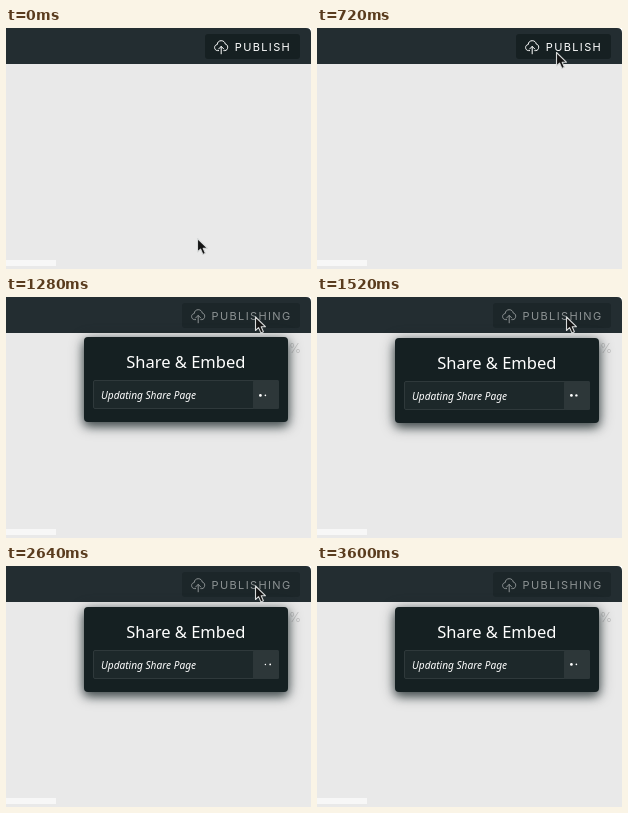
An HTML page that plays this animation: 305x241 px, repeating every 3.68 s.

```html
<!DOCTYPE html>
<html lang="en">
<head>
<meta charset="utf-8">
<title>Publish</title>
<style>
html, body { margin: 0; width: 100%; height: 100%; overflow: hidden; background: #e9e9e9; }
svg { display: block; width: 100%; height: 100%; }
.label { font: 400 11px Inter, Roboto, sans-serif; letter-spacing: 1.36px; }
.percent { font: 300 13px Inter, Roboto, sans-serif; }
.title { font: 400 16.5px "Noto Sans", "Open Sans", sans-serif; }
.status { font: italic 500 10.1px "Noto Sans", "Open Sans", sans-serif; }
</style>
</head>
<body>
<svg viewBox="0 0 305 241">
  <defs>
    <filter id="near" x="-30%" y="-60%" width="160%" height="220%" color-interpolation-filters="sRGB">
      <feGaussianBlur stdDeviation="5"/>
    </filter>
    <filter id="far" x="-30%" y="-60%" width="160%" height="220%" color-interpolation-filters="sRGB">
      <feGaussianBlur stdDeviation="7.5"/>
    </filter>
    <g id="cloud" fill="none" stroke="currentColor" stroke-linecap="round" stroke-linejoin="round">
      <path d="M4.6 10.6H3.6C1.6 10.6.6 9 .6 7.5.6 5.9 1.7 4.7 3.2 4.6 3.3 2.2 5 .7 7.2.7c2.2 0 3.7 1.3 4.1 3.4 1.5.2 2.4 1.5 2.4 3.1 0 1.9-1.1 3.4-3 3.4h-.9"/>
      <path d="M7.2 13.8V6.5M4.6 9l2.6-2.6L9.8 9"/>
    </g>
  </defs>

  <rect width="305" height="241" fill="#e9e9e9"/>
  <rect y="232" width="50" height="6" fill="#f7f7f7"/>
  <path d="M299 0h6v6z" fill="#fff"/>
  <path d="M0 0H300Q305 0 305 5V36H0z" fill="#232d31"/>

  <g id="publish" color="#fff">
    <rect x="199" y="6" width="95" height="25" rx="3" fill="#162022"/>
    <use href="#cloud" x="208" y="12"/>
    <text class="label" x="228.8" y="23" fill="#fff">PUBLISH</text>
  </g>

  <g id="busy" color="#8d9394">
    <rect x="176" y="6" width="118" height="25" rx="3" fill="#1c2629"/>
    <use href="#cloud" x="185" y="12"/>
    <text class="label" x="205.6" y="23" fill="#8d9394">PUBLISHING</text>
    <text class="percent" x="283" y="56" fill="#bdbdbd">%</text>
    <g id="panel">
      <rect x="78" y="44" width="204" height="85" rx="4" fill="#142022" opacity=".5" filter="url(#far)"/>
      <rect x="78" y="45" width="204" height="85" rx="4" fill="#142022" opacity=".62" filter="url(#near)"/>
      <rect x="78" y="41" width="204" height="85" rx="4" fill="#152022"/>
      <text class="title" x="179.8" y="72" text-anchor="middle" fill="#fff">Share &amp; Embed</text>
      <rect x="87.5" y="84.5" width="185" height="28" rx="1.5" fill="#1d282a" stroke="#2f393b"/>
      <rect x="247" y="84" width="26" height="29" rx="1.5" fill="#2d3739"/>
      <text class="status" x="95" y="103" fill="#fff">Updating Share Page</text>
    </g>
    <g id="dots" fill="#fff">
      <circle cx="254.4" cy="98.4"/><circle cx="259.4" cy="98.4"/><circle cx="264.2" cy="98.4"/>
    </g>
  </g>

  <g id="ring" fill="none">
    <circle cx="253" cy="28" stroke="#000" stroke-width="3.2"/>
    <circle cx="253" cy="28" stroke="#fff" stroke-width="1.2"/>
  </g>

  <path id="arrow" d="M.5.5V14L3.6 11.1 5.9 16.4 8.4 15.3 6.2 10.2H10.4z" fill="#151515" stroke="#d8dada" stroke-width="1.1" stroke-linejoin="round"/>
  <g id="hand" stroke="#333" stroke-width=".9" stroke-linecap="round" stroke-linejoin="round" fill="#fff">
    <path d="M-3.2 8.6C-3.8 6.6-5.6 4.8-7 2.3-7.8.7-6 -.3-4.9 1L-3.8 2.2-5.9-4.5C-6.3-6.3-4.2-6.8-3.7-5.1L-2.3-1-2.5-6.8C-2.5-8.6-.3-8.6-.2-6.9L.1-1.2 1.4-6.6C1.8-8.2 3.9-7.8 3.6-6L2.9-.7 4.8-4.1C5.6-5.5 7.6-4.7 7-3.1L5.8 1.5C5.2 4.2 4.4 5.7 4.2 8.6z"/>
  </g>
</svg>
<script>
const LOOP = 3680, STEP = 80, PRESS = 1120, OPEN = 1280;
const $ = id => document.getElementById(id);
const show = (el, on) => el.setAttribute("display", on ? "inline" : "none");
const move = (el, x, y) => el.setAttribute("transform", `translate(${x} ${y})`);

// pointer route: time, x, y
const route = [
  [0, 191, 210], [80, 197, 196], [160, 221, 140], [240, 252, 68],
  [320, 270, 24.5], [400, 279, 12], [480, 248, 10], [560, 209, 16],
  [640, 220, 25], [720, 239, 24], [800, 249, 19.5], [2720, 249, 19.5],
  [2800, 247, 28], [2880, 230, 78], [2960, 197, 152], [3040, 164, 212.5],
  [3120, 143, 232], [3200, 135, 252]
];
// dot pulse: delay, duration, largest radius
const pulses = [[0, 2100, 1.4], [580, 1800, 1.4], [1340, 1200, 1]];
const CYCLE = 2320, DOT_START = 460;

function pointerAt(t) {
  const i = route.findIndex(p => p[0] > t);
  if (i < 0) return null;
  const [t0, x0, y0] = route[i - 1], [t1, x1, y1] = route[i];
  const k = (t - t0) / (t1 - t0);
  return [x0 + (x1 - x0) * k, y0 + (y1 - y0) * k];
}

function pulse(t, [delay, length, radius]) {
  const u = (t - DOT_START - delay + CYCLE * 2) % CYCLE;
  return u < length ? radius * Math.sin(Math.PI * u / length) ** 0.6 : 0;
}

function draw(t) {
  const open = t >= OPEN, pressed = t >= PRESS && !open;
  const press = pressed ? Math.min(1, (t - PRESS + STEP) / (2 * STEP)) : 0;
  show($("publish"), !open);
  show($("busy"), open);
  show($("ring"), pressed);
  $("publish").setAttribute("transform",
    `translate(246.5 18.5) scale(${1 - 0.07 * press}) translate(-246.5 -18.5)`);
  for (const c of $("ring").children) c.setAttribute("r", 8 + 8.2 * press);

  move($("panel"), 0, -Math.max(0, 1 - (t - OPEN) / 160));
  pulses.forEach((p, i) => $("dots").children[i].setAttribute("r", pulse(t, p)));

  const pos = pointerAt(t), grab = pos && open && pos[1] > 126;
  show($("arrow"), pos && !grab);
  show($("hand"), grab);
  if (pos) move($(grab ? "hand" : "arrow"), ...pos);
}

const start = performance.now();
function tick() {
  const t = (performance.now() - start) % LOOP;
  draw(Math.floor(t / STEP) * STEP);
  requestAnimationFrame(tick);
}
draw(0);
requestAnimationFrame(tick);
</script>
</body>
</html>
```
